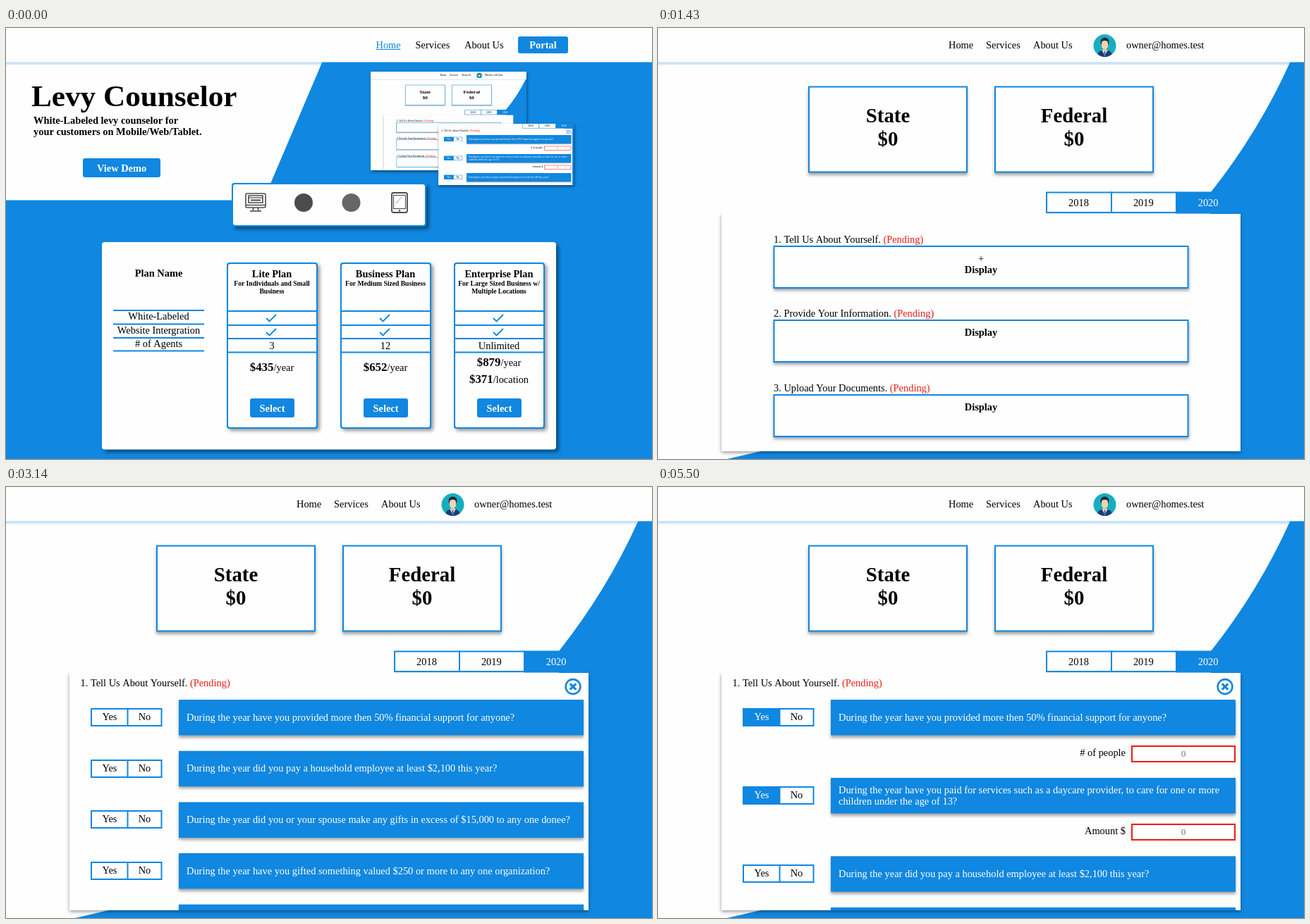
Animation of 916x612 px, one loop 8000 ms. Source, as an HTML page with a canvas:

```html
<!DOCTYPE html>
<html lang="en">
<head>
<meta charset="utf-8">
<title>Levy Counselor</title>
<style>
html, body { margin: 0; width: 100%; height: 100%; overflow: hidden; background: #fefefe; }
canvas { display: block; width: 916px; height: 612px; }
</style>
</head>
<body>
<canvas id="stage" width="916" height="612"></canvas>
<script>
const ctx = document.getElementById('stage').getContext('2d');
const LOOP = 8000;
const BLUE = '#1087e0', WHITE = '#fefefe', INK = '#000', RED = '#ec1c12', GRAY = '#4c4c4c';

const Q = {
  support: ['During the year have you provided more then 50% financial support for anyone?'],
  care: ['During the year have you paid for services such as a daycare provider, to care for one or more',
    'children under the age of 13?'],
  staff: ['During the year did you pay a household employee at least $2,100 this year?'],
  gifts: ['During the year did you or your spouse make any gifts in excess of $15,000 to any one donee?'],
  charity: ['During the year have you gifted something valued $250 or more to any one organization?']
};

function text(s, x, y, { size = 14.4, bold = false, color = INK, align = 'left' } = {}) {
  ctx.font = `${bold ? 'bold ' : ''}${size}px "Liberation Serif", "Times New Roman", serif`;
  ctx.textAlign = align;
  ctx.fillStyle = color;
  ctx.fillText(s, x, y);
  return ctx.measureText(s).width;
}

const mid = (s, x, y, opt) => text(s, x, y, { ...opt, align: 'center' });

function rect(x, y, w, h, fill, { r = 0, shadow } = {}) {
  ctx.save();
  if (shadow) {
    const k = ctx.getTransform().a;
    const [dx, dy, blur, alpha] = shadow;
    ctx.shadowOffsetX = dx * k;
    ctx.shadowOffsetY = dy * k;
    ctx.shadowBlur = blur * k;
    ctx.shadowColor = `rgba(0,0,0,${alpha})`;
  }
  ctx.fillStyle = fill;
  ctx.beginPath();
  ctx.roundRect(x, y, w, h, r);
  ctx.fill();
  ctx.restore();
}

// Box with a 2px border inside its outer edge
function frame(x, y, w, h, color = BLUE, opt = {}) {
  rect(x, y, w, h, color, opt);
  rect(x + 2, y + 2, w - 4, h - 4, WHITE, { r: opt.r ? opt.r - 1 : 0 });
}

function line(points, color, width) {
  ctx.strokeStyle = color;
  ctx.lineWidth = width;
  ctx.beginPath();
  points.forEach(([x, y]) => ctx.lineTo(x, y));
  ctx.stroke();
}

function shape(points, color) {
  ctx.fillStyle = color;
  ctx.beginPath();
  points.forEach(([x, y]) => ctx.lineTo(x, y));
  ctx.fill();
}

function disc(x, y, r, color) {
  ctx.fillStyle = color;
  ctx.beginPath();
  ctx.arc(x, y, r, 0, Math.PI * 2);
  ctx.fill();
}

function clipped(x, y, w, h, draw) {
  ctx.save();
  ctx.beginPath();
  ctx.rect(x, y, w, h);
  ctx.clip();
  draw();
  ctx.restore();
}

function button(label, x, y, w, h, base) {
  rect(x, y, w, h, BLUE, { r: 3 });
  mid(label, x + w / 2, base, { bold: true, color: WHITE });
}

function header() {
  const g = ctx.createLinearGradient(0, 48, 0, 54);
  g.addColorStop(0, 'rgba(16,135,224,.36)');
  g.addColorStop(1, 'rgba(16,135,224,0)');
  ctx.fillStyle = g;
  ctx.fillRect(0, 48, 916, 6);
  rect(0, 0, 916, 48.5, WHITE);
}

function monitor() {
  ctx.strokeStyle = GRAY;
  ctx.lineWidth = 1.6;
  ctx.beginPath();
  ctx.roundRect(340, 235, 28, 20, 2);
  ctx.moveTo(340, 251.5);
  ctx.lineTo(368, 251.5);
  ctx.rect(344, 238, 20, 10);
  ctx.stroke();
  line([[344, 241], [364, 241]], GRAY, 1.2);
  line([[347, 244.5], [361, 244.5]], GRAY, 2);
  line([[351, 255], [350, 259]], GRAY, 1.5);
  line([[357, 255], [358, 259]], GRAY, 1.5);
  line([[346, 260], [362, 260]], GRAY, 1.6);
}

function tablet() {
  ctx.strokeStyle = GRAY;
  ctx.lineWidth = 1.8;
  ctx.beginPath();
  ctx.roundRect(547, 234, 22, 28, 2.5);
  ctx.stroke();
  ctx.lineWidth = 1.1;
  ctx.strokeRect(549.5, 237.5, 17, 19);
  line([[553, 249], [561, 240]], '#999', 1);
  disc(558, 259.3, 1.2, GRAY);
}

function planCard(x, plan) {
  const c = x + 64;
  frame(x, 333, 129, 236, BLUE, { r: 4, shadow: [3, 3, 5, .4] });
  mid(plan.name, c, 354, { bold: true });
  plan.note.forEach((s, i) => mid(s, c, 366 + i * 10.5, { bold: true, size: 9.6 }));
  [401, 421, 440, 459.5].forEach(y => rect(x, y, 129, 2, BLUE));
  [412, 432].forEach(y => line([[c - 8, y], [c - 3.5, y + 4.5], [c + 6, y - 5]], BLUE, 1.8));
  mid(plan.agents, c, 456);
  plan.prices.forEach(([sum, unit], i) => {
    const y = (plan.prices.length > 1 ? 480 : 487) + i * 24;
    const total = sum.length * 8.42 + unit.length * 0;
    ctx.font = '14.4px "Liberation Serif", "Times New Roman", serif';
    const left = c - (total + ctx.measureText(unit).width) / 2;
    const w = text(sum, left, y, { bold: true, size: 16.85 });
    text(unit, left + w, y);
  });
  button('Select', c - 31, 526, 63, 27, 545);
}

const PLANS = [
  { name: 'Lite Plan', note: ['For Individuals and Small', 'Business'], agents: '3', prices: [['$435', '/year']] },
  { name: 'Business Plan', note: ['For Medium Sized Business'], agents: '12', prices: [['$652', '/year']] },
  { name: 'Enterprise Plan', note: ['For Large Sized Business w/', 'Multiple Locations'], agents: 'Unlimited',
    prices: [['$879', '/year'], ['$371', '/location']] }
];

// Small screenshot: the app page scaled into a box
function preview(x, y, w, h, sx, sy, ox, oy, view) {
  rect(x, y, w, h, WHITE, { shadow: [1, 2, 4, .45] });
  clipped(x, y, w, h, () => {
    ctx.transform(sx, 0, 0, sy, ox, oy);
    app(view);
  });
}

function landing() {
  rect(0, 0, 916, 612, BLUE);
  shape([[0, 48], [448.5, 48], [365, 244.5], [0, 244.5]], WHITE);
  header();
  text('Home', 524.5, 29, { color: BLUE });
  rect(524.5, 30, 35, 1, BLUE);
  text('Services', 580.5, 29);
  text('About Us', 650, 29);
  button('Portal', 726, 12, 71, 24, 29);

  text('Levy Counselor', 36, 111, { bold: true, size: 43.2 });
  text('White-Labeled levy counselor for', 39, 136, { bold: true });
  text('your customers on Mobile/Web/Tablet.', 39, 152, { bold: true });
  button('View Demo', 109, 185, 110, 27, 204);

  preview(517, 62, 221, 140, .25, .2345, 512.75, 61.5, { user: 'Marlow Ash Tarn', small: true });
  preview(613, 136, 192, 87, .258, .243, 590, 78.5,
    { rows: [[Q.support, 'Yes', '# of people'], [Q.care, 'Yes', 'Amount $'], [Q.staff, 'Yes']], bar: 1 });

  frame(320, 220, 276, 62, BLUE, { r: 4, shadow: [4, 4, 5, .42] });
  monitor();
  disc(422, 248, 13, GRAY);
  disc(489.5, 248, 13, '#666');
  tablet();

  rect(136, 304, 644, 294.5, WHITE, { r: 4, shadow: [4, 4, 5, .42] });
  mid('Plan Name', 216.5, 353, { bold: true });
  [400, 419.5, 439, 457.5].forEach(y => rect(152, y, 129, 2, BLUE));
  ['White-Labeled', 'Website Intergration', '# of Agents'].forEach((s, i) =>
    mid(s, 216.5, [414, 434, 453][i]));
  PLANS.forEach((p, i) => planCard(313 + i * 161, p));
}

function avatar() {
  ctx.save();
  disc(633.5, 25, 16, '#16aebf');
  ctx.beginPath();
  ctx.arc(633.5, 25, 16, 0, Math.PI * 2);
  ctx.clip();
  rect(623.5, 32, 20, 14, '#1c3c6e', { r: 6 });
  shape([[629.5, 31], [637.5, 31], [633.5, 40]], '#f4f4f4');
  shape([[632.5, 33], [634.5, 33], [635, 39], [632, 39]], '#2777b8');
  rect(631, 27, 5, 6, '#eebf98');
  disc(633.5, 19.5, 6, '#262a3c');
  rect(629, 18, 9, 11.5, '#f8d1ae', { r: 4 });
  ctx.restore();
}

function pending(label, x, y) {
  const w = text(label + ' ', x, y);
  text('(Pending)', x + w, y, { color: RED });
}

function sections(small) {
  ['1. Tell Us About Yourself.', '2. Provide Your Information.', '3. Upload Your Documents.'].forEach((s, i) => {
    const y = [309, 414, 520][i];
    pending(s, 164, y - 4);
    frame(163.5, y, 589, 61, BLUE, { shadow: [0, 3, 4, .35] });
    if (small) return;
    if (!i) mid('+', 458, 332);
    mid('Display', 458, i ? y + 23 : 348, { bold: true });
  });
}

function toggle(y, pick) {
  frame(120, y, 101.5, 26);
  if (pick === 'Yes') rect(120, y, 53, 26, BLUE);
  if (pick === 'No') rect(172, y, 49.5, 26, BLUE);
  rect(171.5, y, 2, 26, BLUE);
  const base = Math.round(y + 16.6);
  [['Yes', 147], ['No', 196.5]].forEach(([s, x]) => mid(s, x, base, { color: s === pick ? WHITE : INK }));
}

function questions(rows) {
  let y = 302;
  rows.forEach(([lines, pick, field]) => {
    rect(245, y, 574, 50.5, BLUE, { shadow: [0, 3, 4, .35] });
    const base = Math.floor(y + (lines.length > 1 ? 22 : 30));
    lines.forEach((s, i) => text(s, 256, base + i * 16, { color: WHITE }));
    toggle(Math.round(y + 12), pick);
    if (field) {
      const top = Math.round(y + 64.7);
      text(field, 663, top + 15, { align: 'right' });
      frame(671, top, 148, 24, RED);
      mid('0', 745, top + 16, { size: 13.3, color: '#757575' });
      y += 38.4;
    }
    y += 72.7;
  });
}

function closeIcon(x, y) {
  ctx.strokeStyle = BLUE;
  ctx.lineWidth = 2.6;
  ctx.beginPath();
  ctx.arc(x, y, 10.4, 0, Math.PI * 2);
  ctx.stroke();
  line([[x - 4.2, y - 4.2], [x + 4.2, y + 4.2]], BLUE, 3.2);
  line([[x - 4.2, y + 4.2], [x + 4.2, y - 4.2]], BLUE, 3.2);
}

function app({ user = 'owner@homes.test', small = false, rows = null, bar = 0 }) {
  rect(0, 0, 916, 612, WHITE);
  ctx.fillStyle = BLUE;
  ctx.beginPath();
  ctx.moveTo(896.5, 48);
  ctx.quadraticCurveTo(852, 147, 784, 233);
  [[784, 598], [150, 600], [98, 612], [916, 612], [916, 48]].forEach(([x, y]) => ctx.lineTo(x, y));
  ctx.fill();
  header();
  text('Home', 412, 29);
  text('Services', 465, 29);
  text('About Us', 532, 29);
  avatar();
  text(user, 664, 29);

  [['State', 213], ['Federal', 477]].forEach(([s, x]) => {
    frame(x, 82.5, 226, 123, BLUE, { shadow: [0, 3, 4, .35] });
    mid(s, x + 113, 134, { bold: true, size: 28.8 });
    mid('$0', x + 113, 167, { bold: true, size: 28.8 });
  });

  rect(90, 264, 736, 337, WHITE, { shadow: [0, 2, 5, .4] });
  rect(90, 258, 460, 6, WHITE);
  frame(550, 232.5, 94, 30.5);
  frame(642, 232.5, 94, 30.5);
  rect(734, 232.5, 92, 31, BLUE);
  ['2018', '2019', '2020'].forEach((s, i) =>
    mid(s, 596.5 + i * 91.8, 253, { color: i === 2 ? WHITE : INK }));

  clipped(90, 263.5, 736, 337.5, () => {
    if (!rows) return sections(small);
    pending('1. Tell Us About Yourself.', 105.5, 283);
    closeIcon(804, 283.5);
    questions(rows);
    if (bar > 0) rect(819.5, 266.5, 2.5, 85.5, `rgba(125,125,125,${.75 * bar})`, { r: 1 });
  });
}

const people = [Q.support, 'Yes', '# of people'];

function draw(t) {
  if (t < 1430) return landing();
  if (t < 2530) return app({});
  if (t < 3650) {
    // The scroll bar fades away in three steps
    const step = t < 2940 ? 0 : Math.min(3, 1 + Math.floor((t - 2940) / 100));
    return app({ rows: [[Q.support], [Q.staff], [Q.gifts], [Q.charity], [Q.care]], bar: 1 - step / 3 });
  }
  if (t < 5500) {
    return app({ rows: [people, [Q.care, t < 4440 ? '' : 'No'], [Q.staff], [Q.gifts]] });
  }
  app({ rows: [people, [Q.care, 'Yes', 'Amount $'], [Q.staff], [Q.gifts]] });
}

const start = performance.now();

function tick() {
  ctx.clearRect(0, 0, 916, 612);
  draw((performance.now() - start) % LOOP);
  requestAnimationFrame(tick);
}
tick();
</script>
</body>
</html>
```
